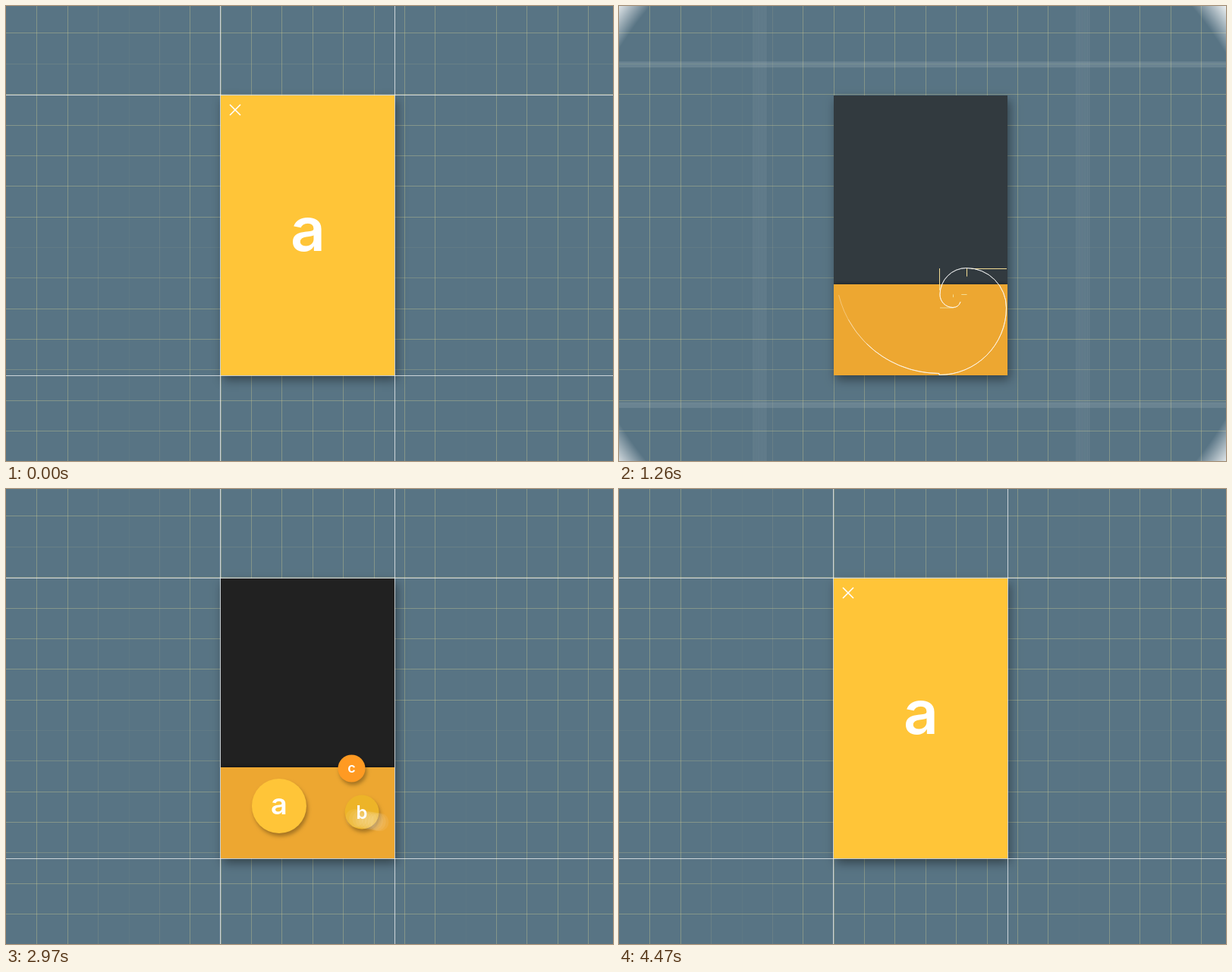
Write an HTML page with a canvas that moves like this. It is 800 by 600 pixels and loops after 4.5 s.

```html
<!DOCTYPE html>
<html lang="en">
<head>
<meta charset="utf-8">
<title>Golden card</title>
<style>
html, body { margin: 0; width: 100%; height: 100%; overflow: hidden; background: #fff; }
canvas { display: block; }
</style>
</head>
<body>
<canvas width="800" height="600"></canvas>
<script>
const ctx = document.querySelector('canvas').getContext('2d');
const LOOP = 4500, STEP = 30, SHUTTER = 20;
const SLATE = '#587484', AMBER = '#ffc538', ORANGE = '#eda731';
const CARD = { left: 283, top: 118, right: 512, bottom: 487 };
const FAB = [456, 369], REST = [559, 450], HOME = [360, 418], EXIT = [646, 577];

const clamp = p => Math.max(0, Math.min(1, p));
const seg = (t, from, to) => clamp((t - from) / (to - from));
const mix = (a, b, p) => a + (b - a) * p;
const mixPoint = (a, b, p) => [mix(a[0], b[0], p), mix(a[1], b[1], p)];
const cubic = p => p < .5 ? 4 * p ** 3 : 1 - (2 - 2 * p) ** 3 / 2;
const quad = p => p < .5 ? 2 * p * p : 1 - (2 - 2 * p) ** 2 / 2;
const out = p => 1 - (1 - p) ** 3;

function layer(alpha, draw) {
  if (alpha <= 0) return;
  ctx.save();
  ctx.globalAlpha *= alpha;
  draw();
  ctx.restore();
}

function shadow(x, y, blur, alpha) {
  ctx.shadowColor = `rgba(0,0,0,${alpha})`;
  ctx.shadowOffsetX = x;
  ctx.shadowOffsetY = y;
  ctx.shadowBlur = blur;
}

function rect(color, x0, y0, x1, y1) {
  ctx.fillStyle = color;
  ctx.fillRect(x0, y0, x1 - x0, y1 - y0);
}

function line(color, width, x0, y0, x1, y1) {
  ctx.strokeStyle = color;
  ctx.lineWidth = width;
  ctx.beginPath();
  ctx.moveTo(x0, y0);
  ctx.lineTo(x1, y1);
  ctx.stroke();
}

function disc(color, [x, y], r) {
  ctx.fillStyle = color;
  ctx.beginPath();
  ctx.arc(x, y, Math.max(0, r), 0, 7);
  ctx.fill();
}

function letter(char, x, baseline, size) {
  ctx.font = `600 ${size}px Inter, sans-serif`;
  ctx.textAlign = 'center';
  ctx.fillStyle = '#fff';
  ctx.fillText(char, x, baseline);
}

// Motion blur: several translucent copies across the open shutter.
function blurred(t, alpha, shutter, draw) {
  const copies = 9, each = 1 - (1 - alpha) ** (1 / copies);
  for (let i = 0; i < copies; i++)
    layer(each, () => draw(t + shutter * (i / (copies - 1) - .5)));
}

function drawGrid() {
  rect(SLATE, 0, 0, 800, 600);
  const faintX = { 2: .4, 3: .12, 4: .35, 14: .08 }, faintY = { 1: .35, 7: .2, 8: .7, 11: .7 };
  for (let i = 0; i < 19; i++) {
    const x = Math.floor(40.99 + 40.37 * i) + .5, y = Math.floor(35.99 + 40.36 * i) + .5;
    layer(.36 * (faintX[i] ?? 1), () => line('#d3cf92', 1, x, 0, x, 600));
    layer(.36 * (faintY[i] ?? 1), () => line('#d3cf92', 1, 0, y, 800, y));
  }
}

function drawBackground(t) {
  if (t < 1095) return rect('#fff', 0, 0, 800, 600);
  drawGrid();
  const r = 2.71 * (t - 1080);
  if (r > 530) return;
  const veil = ctx.createRadialGradient(398, 303, Math.max(0, r - 20), 398, 303, r + 20);
  veil.addColorStop(0, '#fff0');
  veil.addColorStop(1, '#fff');
  rect(veil, 0, 0, 800, 600);
}

function guides(t) {
  const p = out(seg(t, 1110, 1610));
  for (const x of [mix(0, 282.5, p), mix(800, 512.5, p)]) line('#fff', 1, x, 0, x, 600);
  for (const y of [mix(0, 117.5, p), mix(600, 487.5, p)]) line('#fff', 1, 0, y, 800, y);
}

function cardBox(t) {
  const tall = cubic(seg(t, 30, 300)), wide = out(seg(t, 230, 690));
  return [mix(CARD.left + 10, CARD.left, wide), CARD.top,
    mix(CARD.left + 12, CARD.right, wide), mix(CARD.top, CARD.bottom, tall)];
}

function drawSpiral(t) {
  const trim = cubic(seg(t, 360, 760)) - cubic(seg(t, 1040, 1390));
  const dividers = [
    [511, 346.5, 284, 346.5], [422.5, 346, 422.5, 487], [423, 398, 511, 398],
    [458.5, 346, 458.5, 398], [458.5, 380.5, 423, 380.5], [440.5, 380.5, 440.5, 398]
  ];
  if (trim > 0)
    for (const [x0, y0, x1, y1] of dividers)
      line('#f3dc94', 1, x0, y0, mix(x0, x1, trim), mix(y0, y1, trim));

  const length = 894 * (cubic(seg(t, 345, 870)) - cubic(seg(t, 1092, 1442)));
  if (length <= 0) return;
  // Quarter arcs from the inside out: centre x, centre y, radius.
  const arcs = [[440, 387, 10.5], [440, 380.5, 17], [458, 380.5, 35], [458, 398, 52.5],
    [422, 398, 88.5], [422, 348, 136.5], [511, 346, 227]];
  const path = new Path2D();
  arcs.forEach(([x, y, r], i) => {
    const start = Math.PI / 2 * i;
    path.arc(x, y, r, i ? start : .3, start + Math.PI / 2);
  });
  ctx.strokeStyle = '#fff';
  for (const [share, width] of [[1, .35], [.93, .4], [.85, .7]]) {
    ctx.lineWidth = width;
    ctx.setLineDash([length * share, 2000]);
    ctx.stroke(path);
  }
  ctx.setLineDash([]);
}

function drawCard(t) {
  const [x0, y0, x1, y1] = cardBox(t);
  layer(1, () => {
    shadow(3, 6, 13, .42);
    rect(SLATE, x0, y0, x1, y1);
  });
  ctx.beginPath();
  ctx.rect(x0, y0, x1 - x0, y1 - y0);
  ctx.clip();
  layer(cubic(seg(t, 1100, 1380)), () => rect('#212121', x0, y0, x1, y1));
  const rise = out(seg(t, 1080, 1250));
  if (rise > 0) layer(1, () => {
    shadow(0, -1, 5, .4);
    rect(ORANGE, x0, mix(CARD.bottom, 367, rise), x1, y1);
  });
  drawSpiral(t);
}

function button(color, char, at, r, size, ink = 1) {
  layer(1, () => {
    shadow(2, 4, 5, .3);
    disc(color, at, r);
  });
  layer(ink, () => letter(char, at[0], at[1] + size * .28 + (char === 'b' ? size * .08 : 0), size));
}

// Swing outwards round the eye of the spiral, from the round button's place.
function swing(angle, radius, p) {
  const a = mix(-67, angle, p) * Math.PI / 180, r = 20.6 * (radius / 20.6) ** p;
  return [448 + r * Math.cos(a), 388 + r * Math.sin(a)];
}

function drawButtons(t) {
  const pop = out(seg(t, 1470, 1680));
  if (pop <= 0) return;
  const press = cubic(seg(t, 2230, 2340));
  if (t > 2380) {
    const spread = cubic(seg(t, 2540, 2900));
    if (spread > 0) {
      button('#edb428', 'b', swing(61, 43.5, spread), mix(16, 22.5, spread), mix(15, 24, spread));
      if (t < 3330) {
        const p = cubic(seg(t, 2560, 2980));
        const dip = Math.sin(Math.PI * seg(t, 3150, 3330)) * 2;
        button(AMBER, 'a', swing(161.2, 93, p), mix(16, 36, p) - dip, mix(15, 38, p), 1 - seg(t, 3250, 3330));
      }
    }
    button('#ff9a22', 'c', [455.5, 368.5], 18, 18, seg(t, 2600, 2720));
  }
  layer(1 - seg(t, 2540, 2700), () => {
    layer(1, () => {
      shadow(2, 4, 5, .3);
      disc(AMBER, FAB, mix(19, 17.3, press) * pop);
    });
    const arm = 6.5 * pop;
    line('#fff', 2, FAB[0] - arm, FAB[1], FAB[0] + arm, FAB[1]);
    line('#fff', 2, FAB[0], FAB[1] - arm, FAB[0], FAB[1] + arm);
  });
}

function sheet(t) {
  const s = cubic(seg(t, 3333, 3593)), bend = [310, 345];
  const at = mixPoint(mixPoint(HOME, bend, s), mixPoint(bend, [398, 303], s), s);
  disc(AMBER, at, mix(36, 240, cubic(seg(t, 3440, 3740))));
}

function drawSheet(t) {
  if (t < 3330) return;
  layer(1, () => {
    ctx.beginPath();
    ctx.rect(CARD.left, CARD.top, CARD.right - CARD.left, CARD.bottom - CARD.top);
    ctx.clip();
    if (t < 3740) blurred(t, .97, 45, sheet);
    else sheet(t);
  });
  layer(seg(t, 3650, 3830), () => letter('a', 398, 323, 80));
  layer(seg(t, 3880, 4040), () => {
    line('#fff', 1.6, 295, 130, 309, 144);
    line('#fff', 1.6, 309, 130, 295, 144);
  });
}

function cursor(t) {
  let at = mixPoint([728, 220], FAB, cubic(seg(t, 1780, 2160)));
  if (t > 2350) at = mixPoint(FAB, REST, cubic(seg(t, 2350, 2690)));
  if (t > 2820) at = mixPoint(REST, HOME, cubic(seg(t, 2820, 3140)));
  if (t > 3284) at = mixPoint(HOME, EXIT, quad(seg(t, 3284, 3720)));
  const tap = Math.sin(Math.PI * seg(t, 2200, 2340)) + Math.sin(Math.PI * seg(t, 3150, 3280));
  disc('#fff', at, (12 - 2.5 * tap) * out(seg(t, 1640, 1730)));
}

function render(t) {
  drawBackground(t);
  layer(1, () => drawCard(t));
  drawButtons(t);
  drawSheet(t);
  if (t >= 1600) layer(.7, () => guides(t));
  else if (t > 1110) blurred(t, .62, SHUTTER, guides);
  const shown = .5 * (1 - seg(t, 3690, 3775));
  if (t > 1640 && shown > 0) blurred(t, shown, SHUTTER, cursor);
}

function tick() {
  const t = Math.floor(performance.now() % LOOP / STEP) * STEP;
  render(t || LOOP - STEP);
  requestAnimationFrame(tick);
}
tick();
</script>
</body>
</html>
```
